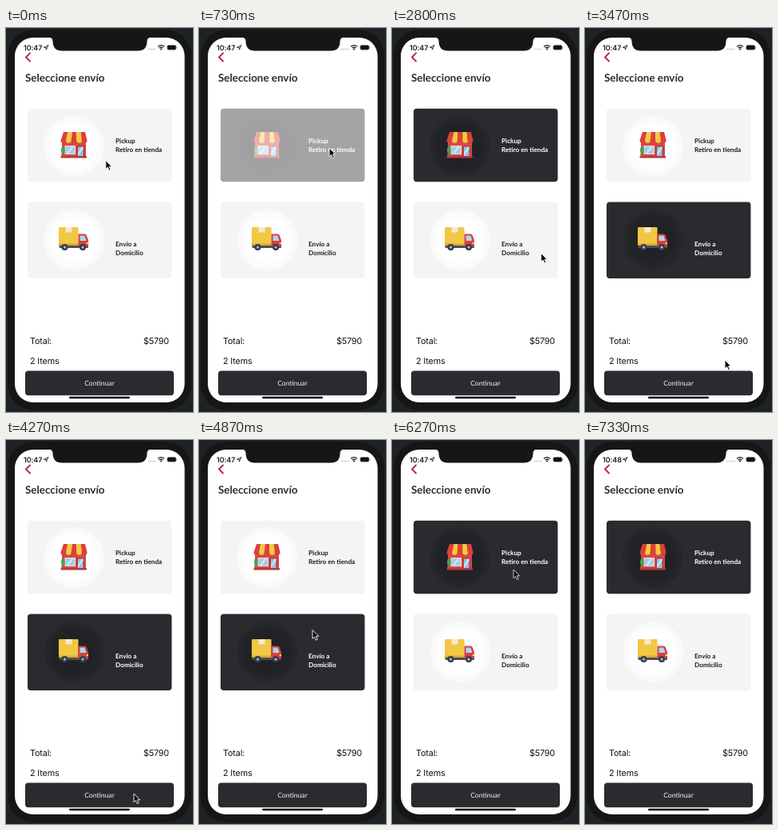
Animation, 234 px wide and 480 px high, one loop 8.14 s. Source, as an HTML page:

```html
<!DOCTYPE html>
<html lang="es">
<head>
<meta charset="utf-8">
<title>Seleccione envío</title>
<style>
  html, body { margin: 0; width: 100%; height: 100%; overflow: hidden; background: #1d2326; }
  svg { display: block; width: 234px; height: 480px; }
  text { fill: #1d1d20; text-rendering: geometricPrecision; }
  .time { font: 600 9px Inter, sans-serif; letter-spacing: -.1px; }
  .title { font: 700 13.4px Lato, sans-serif; fill: #2c2c30; }
  .label { font: 700 8.2px Lato, sans-serif; }
  .sum { font: 400 10.8px Inter, sans-serif; letter-spacing: -.15px; fill: #111; }
  .go { font: 400 8.6px Lato, sans-serif; fill: #f4f4f4; }
  .panel { fill: #f4f4f4; }
  .disc { fill: url(#glow); }
  .on .panel { fill: #2a2b2f; }
  .on .disc { fill: url(#shade); }
  .on .label { fill: #fff; }
</style>
</head>
<body>
<svg viewBox="0 0 234 480">
  <defs>
    <radialGradient id="glow">
      <stop offset=".6" stop-color="#fff"/>
      <stop offset="1" stop-color="#f9f9f9"/>
    </radialGradient>
    <radialGradient id="shade">
      <stop offset=".6" stop-color="#212226"/>
      <stop offset="1" stop-color="#26272b"/>
    </radialGradient>
  </defs>

  <!-- phone -->
  <rect x="1.5" y="1.5" width="231" height="477" rx="33" fill="#161617" stroke="#222526"/>
  <rect x="11" y="12" width="212.5" height="456" rx="23" fill="#fff"/>
  <path d="M54 11.5Q58 12 58.500 16V17Q59 28.500 70 28.500H165Q176 28.500 176.500 17V16Q177 12 181 11.500Z" fill="#161617"/>

  <!-- status bar -->
  <text id="time" class="time" x="22" y="28">10:47</text>
  <path d="M47.300 24.300L53 21.500L50.300 27.200V24.300Z" fill="none" stroke="#222" stroke-width=".9" stroke-linejoin="round"/>
  <path d="M178 26.500H187.500" stroke="#bbb" stroke-width="1.500" stroke-dasharray="1.500 1.100"/>
  <g fill="none" stroke="#111" stroke-width="1.300">
    <path d="M190 23.300Q194 20 198 23.300"/>
    <path d="M191.600 25Q194 23.200 196.400 25"/>
  </g>
  <circle cx="194" cy="26.500" r="1" fill="#111"/>
  <rect x="201.800" y="21.600" width="11" height="5.600" rx="1.600" fill="#111" stroke="#777" stroke-width=".5"/>
  <path d="M213.900 23.500V25.400" stroke="#888" stroke-width=".8"/>

  <path d="M30 31.500L25 36.500L30 41.500" fill="none" stroke="#bd2742" stroke-width="1.900" stroke-linecap="round" stroke-linejoin="round"/>
  <text class="title" x="24" y="66.700">Seleccione envío</text>

  <g id="pickup">
    <rect class="panel" x="27" y="100.800" width="180.400" height="91.400" rx="4"/>
    <circle class="disc" cx="85" cy="147.500" r="38"/>
    <rect x="70" y="139" width="30" height="22.500" fill="#d9483f"/>
    <rect x="68.500" y="160" width="32.500" height="2.500" rx=".8" fill="#b8373a"/>
    <rect x="73.500" y="147" width="13.500" height="11" fill="#f0d9d3"/>
    <rect x="74.700" y="148.200" width="11" height="8.600" fill="#9fcdec"/>
    <path d="M76 156.800L82 148.200H84.500L78.500 156.800Z" fill="#d3eaf8"/>
    <rect x="88.500" y="147" width="9.500" height="13.500" fill="#b8373a"/>
    <rect x="90" y="148.500" width="6.500" height="11.500" fill="#8fc3e8"/>
    <path d="M90 156L95 148.500H96.500V151L90 160Z" fill="#c9e6f6"/>
    <ellipse cx="71.300" cy="152.500" rx="2.300" ry="4.300" fill="#44a35b"/>
    <rect x="69.300" y="156.500" width="4" height="4" rx=".5" fill="#a8643c"/>
    <g id="awning"></g>
    <text class="label" x="137" y="144.300">Pickup</text>
    <text class="label" x="137" y="155.200">Retiro en tienda</text>
  </g>

  <g id="home">
    <rect class="panel" x="27" y="217.400" width="180.400" height="95.600" rx="4"/>
    <circle class="disc" cx="85.500" cy="265" r="38"/>
    <rect x="66.500" y="270.500" width="36.500" height="4.500" rx="1" fill="#4b4f5c"/>
    <rect x="66" y="249" width="24.500" height="23" rx="1" fill="#f1c844"/>
    <rect x="66" y="269.500" width="24.500" height="2.500" fill="#dca92f"/>
    <path d="M74.500 249H82.500V256L80.500 255L78.500 256L76.500 255L74.500 256Z" fill="#f8ead0"/>
    <path d="M90.500 257.500H98.500Q100 257.500 100.700 259L103 265.500V273H90.500Z" fill="#d93f3c"/>
    <path d="M92.500 259.500H98.500L100.500 266H92.500Z" fill="#a9d5ef"/>
    <rect x="100.700" y="268" width="2.300" height="2" fill="#f6d77c"/>
    <g fill="#a9c3d0" stroke="#393c47" stroke-width="2.500">
      <circle cx="73.500" cy="274" r="2.800"/>
      <circle cx="96" cy="274" r="2.800"/>
    </g>
    <text class="label" x="137" y="273.300">Envío a</text>
    <text class="label" x="137" y="284.200">Domicilio</text>
  </g>

  <text class="sum" x="30" y="395.400">Total:</text>
  <text class="sum" x="204" y="395.400" text-anchor="end">$5790</text>
  <text class="sum" x="30" y="420.400">2 Items</text>

  <g id="next">
    <rect x="24" y="428.500" width="186" height="30.800" rx="4" fill="#2a2b2f"/>
    <text class="go" x="117" y="447" text-anchor="middle">Continuar</text>
  </g>
  <rect x="79" y="460.700" width="76" height="2.600" rx="1.300" fill="#0a0a0a"/>

  <path id="cursor" d="M0 0V10.800L2.500 8.500L4.300 12.600L6.200 11.800L4.500 7.800H7.700Z" fill="#0a0a0a" stroke="#fff" stroke-width=".9" stroke-linejoin="round"/>
</svg>
<script>
  const LOOP = 8140, STEP = 1000 / 15;
  const $ = id => document.getElementById(id);

  // cursor stops: time, x, y
  const path = [
    [0, 124.8, 165.6], [330, 163, 150], [1000, 163, 150], [1270, 156, 147],
    [1730, 152.5, 310.5], [2130, 157, 346], [2200, 157, 345],
    [2800, 186.5, 281.5], [3190, 186, 282], [3470, 175, 415],
    [3870, 160, 442], [4590, 160, 442], [4870, 142, 237.5], [5070, 152, 162]
  ];
  // element, finger down, finger up
  const taps = [
    ['pickup', 435, 640], ['home', 3035, 3190],
    ['next', 4440, 4590], ['pickup', 5560, 5737]
  ];

  const clamp = v => Math.min(1, Math.max(0, v));
  const ease = v => v < .5 ? 2 * v * v : 1 - 2 * (1 - v) ** 2;
  const ramp = (t, start, length) => ease(clamp((t - start) / length));

  function cursorAt(t) {
    const i = path.findIndex(p => p[0] > t);
    if (i < 0) return path[path.length - 1].slice(1);
    const [t0, x0, y0] = path[i - 1], [t1, x1, y1] = path[i];
    const k = ramp(t, t0, t1 - t0);
    return [x0 + (x1 - x0) * k, y0 + (y1 - y0) * k];
  }

  function draw(t) {
    const alpha = { pickup: 1, home: 1, next: 1 };
    let chosen = '';
    for (const [id, down, up] of taps) {
      alpha[id] -= .8 * (ramp(t, down, 150) - ramp(t, up, 250));
      if (id !== 'next' && t >= up) chosen = id;
    }
    for (const id in alpha) {
      $(id).setAttribute('opacity', alpha[id]);
      $(id).classList.toggle('on', id === chosen);
    }
    $('cursor').setAttribute('transform', `translate(${cursorAt(t)})`);
    $('cursor').setAttribute('opacity', 1 - clamp((t - 6200) / 330));
    $('time').textContent = t < 7330 ? '10:47' : '10:48';
  }

  function awning(count) {
    const top = i => 72 + i * 27 / count, low = i => 68.5 + i * 33 / count;
    const r = 16.5 / count;
    let out = '';
    for (let i = 0; i < count; i++) {
      out += `<path d="M${top(i)} 130H${top(i + 1)}L${low(i + 1)} 140.5A${r} ${r} 0 0 1 ${low(i)} 140.5Z"
        fill="${i % 2 ? '#f5c93f' : '#dc403b'}"/>`;
    }
    return out;
  }

  $('awning').innerHTML = awning(5);
  const start = performance.now();
  function tick() {
    const t = (performance.now() - start) % LOOP;
    draw(Math.floor((t + 5) / STEP) * STEP);
    requestAnimationFrame(tick);
  }
  draw(0);
  requestAnimationFrame(tick);
</script>
</body>
</html>
```
